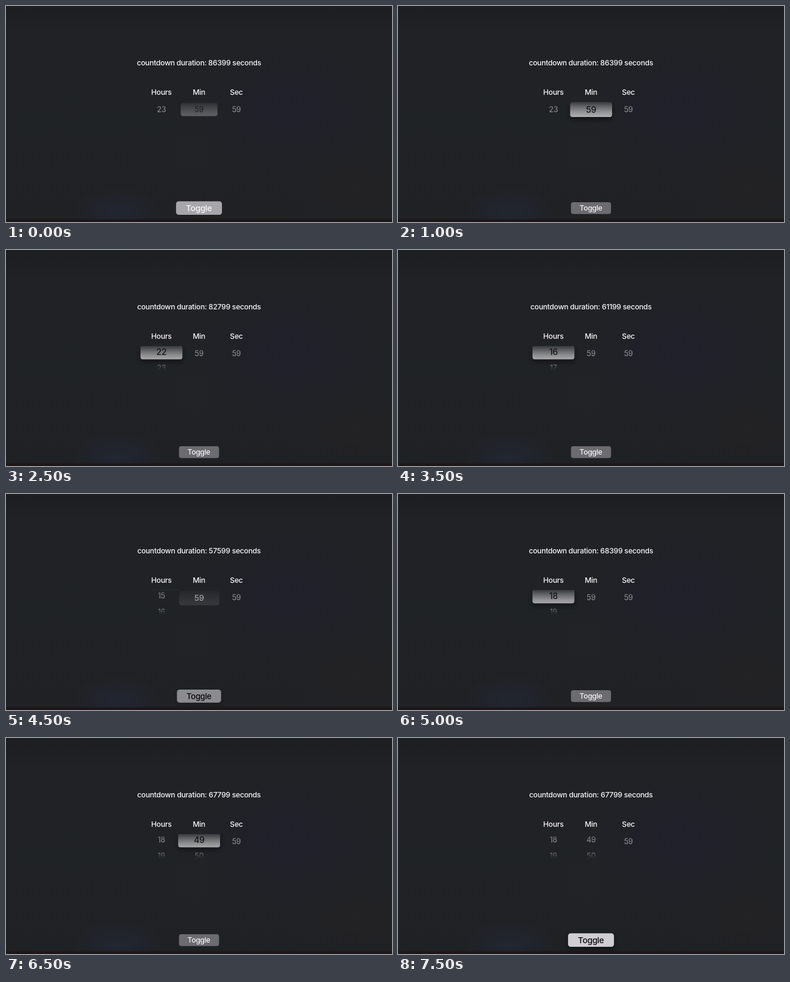
Recreate the animation shown at these times as an HTML page with a canvas. Size 640x360 px, loop 8 s.

```html
<!DOCTYPE html>
<html lang="en">
<head>
<meta charset="utf-8">
<title>Countdown picker</title>
<style>
html, body { margin: 0; width: 100%; height: 100%; overflow: hidden; background: #202326; }
canvas { display: block; width: 640px; height: 360px; }
</style>
</head>
<body>
<canvas id="stage" width="640" height="360"></canvas>
<script>
const ctx = document.getElementById('stage').getContext('2d');
const STEP = 500;
const FONT = 'Inter, Roboto, sans-serif';
const WHITE = '#f6f6f7', BLACK = '#08080a';
const COLUMNS = { hours: 257.7, min: 320.2, sec: 382 };

// Button looks
const rest = { scale: 1, fill: '#6b6b70', ink: WHITE, shadow: 0 };
const leaving = { scale: 1.145, fill: '#a7a6ab', ink: WHITE, shadow: 0 };
const settling = { scale: 1.01, fill: '#6e6e73', ink: WHITE, shadow: 0 };
const rising = { scale: 1.1, fill: '#8c8b90', ink: BLACK, shadow: 0.15 };
const lifted = { scale: 1.14, fill: '#bdbbc0', ink: BLACK, shadow: 0.45 };
const focused = { scale: 1.145, fill: '#d0ced2', ink: BLACK, shadow: 0.45 };

// Picker cell looks
const on = col => ({ col, scale: 1.14, glow: 0.66, ink: 'rgba(16,16,19,.95)', shadow: 0.5 });
const fadeIn = { col: 'min', scale: 1, glow: 0.3, ink: 'rgba(30,31,35,.9)', shadow: 0 };
const nearlyOn = { ...on('min'), scale: 1.13, glow: 0.62, shadow: 0.42 };
const fadeOut = { col: 'min', scale: 1.09, glow: 0.1, ink: 'rgba(255,255,255,.55)', shadow: 0, dy: 1, edge: true };
const faint = { col: 'min', scale: 1.06, glow: 0.06, ink: 'rgba(255,255,255,.5)', shadow: 0 };

// hours, minutes, focused cell, button
const states = [
  [23, 59, fadeIn, leaving],
  [23, 59, nearlyOn, settling],
  [23, 59, on('min'), rest],
  [23, 59, on('hours'), rest],
  [23, 59, on('hours'), rest],
  [22, 59, on('hours'), rest],
  [19, 59, on('hours'), rest],
  [16, 59, on('hours'), rest],
  [15, 59, on('hours'), rest],
  [15, 59, fadeOut, rising],
  [18, 59, on('hours'), rest],
  [18, 59, on('min'), rest],
  [18, 54, on('min'), rest],
  [18, 49, on('min'), rest],
  [18, 49, faint, lifted],
  [18, 49, null, focused]
];

function label(text, x, y, ink, size = 12.2) {
  ctx.font = `500 ${size}px ${FONT}`;
  ctx.letterSpacing = `${-0.022 * size}px`;
  ctx.textAlign = 'center';
  ctx.textBaseline = 'alphabetic';
  ctx.fillStyle = ink;
  ctx.fillText(text, x, y + size * 0.364);
}

function glow(x, y, rx, ry, rgb, alpha) {
  ctx.save();
  ctx.translate(x, y);
  ctx.scale(rx, ry);
  const g = ctx.createRadialGradient(0, 0, 0, 0, 0, 1);
  g.addColorStop(0, `rgba(${rgb},${alpha})`);
  g.addColorStop(1, `rgba(${rgb},0)`);
  ctx.fillStyle = g;
  ctx.fillRect(-1, -1, 2, 2);
  ctx.restore();
}

function vertical(y0, y1, stops) {
  const g = ctx.createLinearGradient(0, y0, 0, y1);
  for (const [y, color] of stops) g.addColorStop((y - y0) / (y1 - y0), color);
  return g;
}

function background() {
  ctx.fillStyle = vertical(0, 360, [[0, '#1d1e21'], [50, '#202225'], [200, '#202326'], [360, '#1f2124']]);
  ctx.fillRect(0, 0, 640, 360);
  glow(470, 170, 170, 130, '31,31,44', 0.7);
  glow(185, 345, 80, 45, '35,40,54', 0.7);
  glow(580, 300, 110, 70, '38,34,35', 0.6);
  glow(310, 250, 70, 60, '36,36,39', 0.5);
  ctx.fillStyle = vertical(354, 360, [[354, 'rgba(29,20,22,0)'], [357, '#1d1719'], [360, '#1d1517']]);
  ctx.fillRect(0, 354, 640, 6);
}

function plate(x, y, w, h, r, fill) {
  ctx.beginPath();
  ctx.roundRect(x - w / 2, y - h / 2, w, h, r);
  ctx.fillStyle = fill;
  ctx.fill();
}

function castShadow(x, y, w, h, alpha) {
  if (!alpha) return;
  ctx.save();
  ctx.shadowColor = `rgba(0,0,0,${alpha})`;
  ctx.shadowBlur = 8;
  ctx.shadowOffsetY = 4;
  plate(x, y, w, h, 4, '#242529');
  ctx.restore();
}

function clipTop(draw) {
  ctx.save();
  ctx.beginPath();
  ctx.rect(0, 160, 640, 60);
  ctx.clip();
  draw();
  ctx.restore();
}

function focusPlate(x, y, look) {
  const w = 61 * look.scale, h = 22 * look.scale;
  const white = k => `rgba(255,255,255,${look.glow * k})`;
  clipTop(() => {
    castShadow(x, y, w, h, look.shadow);
    plate(x, y, w, h, 4, vertical(159, 185, [
      [159, white(0.1)], [167, white(0.42)], [176, white(0.75)], [185, white(0.97)]
    ]));
  });
}

function column(name, value, last, look) {
  const x = COLUMNS[name];
  const atEnd = value === last;
  const active = look && look.col === name;
  const y = (atEnd ? 172.5 : 169.7) + (active && look.dy || 0);
  if (active) focusPlate(x, y, look);
  const dim = a => `rgba(255,255,255,${a})`;
  const ink = vertical(160, 202, [
    [160, dim(0.15)], [168, dim(0.4)], [175, dim(0.47)],
    [186, dim(0.47)], [191, dim(0.34)], [201, dim(0)], [202, dim(0)]
  ]);
  clipTop(() => {
    label(value, x, y, active ? look.ink : ink, active ? 12.4 * look.scale : 12.4);
    if (!atEnd) label(value + 1, x, 196.2, ink, 12.4);
  });
}

function button(look) {
  const w = 66.5 * look.scale, h = 19.7 * look.scale;
  castShadow(320, 336.8, w, h, look.shadow);
  plate(320, 336.8, w, h, 4 * look.scale, look.fill);
  label('Toggle', 319.8, 337, look.ink, 12 * look.scale);
}

function draw(time) {
  const [hours, mins, look, toggle] = states[Math.floor(time / STEP) % states.length];
  background();
  label(`countdown duration: ${hours * 3600 + mins * 60 + 59} seconds`, 320, 94.7, WHITE);
  label('Hours', 257.6, 143.2, WHITE);
  label('Min', 320, 143.2, WHITE);
  label('Sec', 382, 143.2, WHITE);
  column('hours', hours, 23, look);
  column('min', mins, 59, look);
  column('sec', 59, 59, look);
  if (look && look.edge) {
    ctx.fillStyle = 'rgba(255,255,255,.05)';
    ctx.fillRect(240, 159, 46, 1);
  }
  button(toggle);
}

const start = performance.now();
function tick() {
  draw(performance.now() - start);
  requestAnimationFrame(tick);
}
tick();
</script>
</body>
</html>
```
